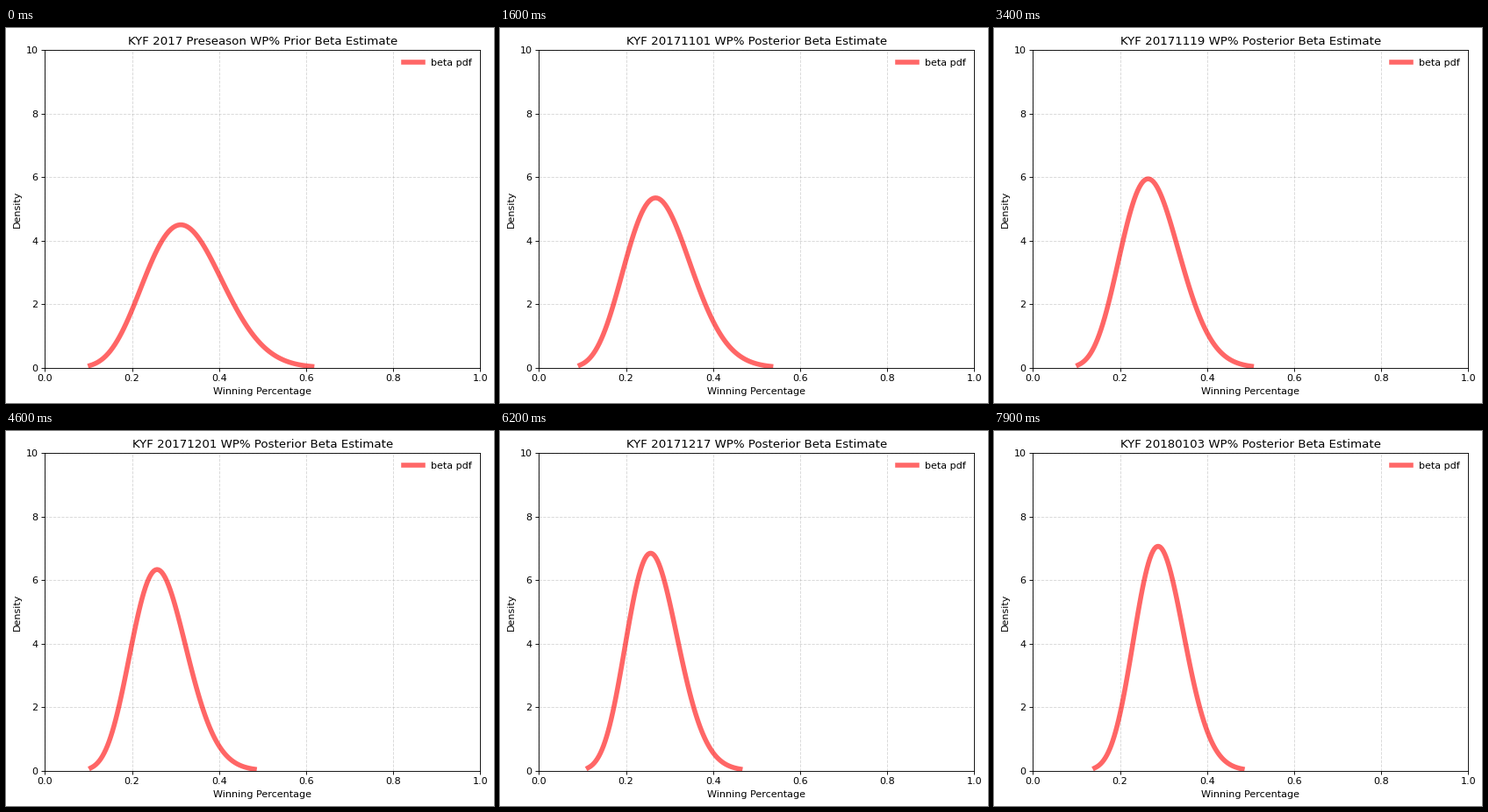
Recreate the animation shown at these times as a matplotlib script. Size 556 by 428 pixels, loop 8000 ms.

```python
from math import lgamma

import matplotlib.pyplot as plt
import numpy as np
from matplotlib.animation import FuncAnimation

plt.rcParams["font.family"] = "DejaVu Sans"

W, H, DPI = 556, 428, 80
FRAMES, STEP = 80, 100
TEAM = "KYF"
EVE = np.datetime64("2017-10-16")  # day before the season opens

# Prior pseudo-counts, then the days (after EVE) of each win and loss
PRIOR = 9.08, 18.82
WINS = np.array([2, 20, 30, 39, 47, 54, 63, 68, 72, 75])
LOSSES = np.array([4, 6, 7, 10, 11, 13, 16, 18, 21, 25, 26, 28, 33, 35, 37,
                   40, 45, 49, 51, 55, 57, 59, 60, 65, 67, 74, 78])

GRID = np.linspace(0, 1, 4001)[1:-1]


def beta_pdf(x, a, b):
    norm = lgamma(a + b) - lgamma(a) - lgamma(b)
    return np.exp(norm + (a - 1) * np.log(x) + (b - 1) * np.log1p(-x))


def beta_curve(a, b):
    """Density between the 0.1% and 99.9% quantiles."""
    cdf = np.cumsum(beta_pdf(GRID, a, b))
    lo, hi = np.interp([0.001, 0.999], cdf / cdf[-1], GRID)
    x = np.linspace(lo, hi, 100)
    return x, beta_pdf(x, a, b)


fig = plt.figure(figsize=(W / DPI, H / DPI), dpi=DPI, facecolor="white")
ax = fig.add_axes([44.4 / W, 40.4 / H, 496 / W, 362.4 / H])
line, = ax.plot([], [], "r-", lw=5, alpha=0.6, label="beta pdf")
ax.set(xlim=(0, 1), ylim=(0, 10),
       xlabel="Winning Percentage", ylabel="Density")
ax.grid(linestyle="--", alpha=0.5)
ax.legend(loc="upper right", frameon=False)
title = ax.set_title("")


def update(day):
    a = PRIOR[0] + np.sum(WINS <= day)
    b = PRIOR[1] + np.sum(LOSSES <= day)
    line.set_data(*beta_curve(a, b))
    if day == 0:
        when, kind = "2017 Preseason", "Prior"
    else:
        when, kind = str(EVE + day).replace("-", ""), "Posterior"
    title.set_text(f"{TEAM} {when} WP% {kind} Beta Estimate")
    return line, title


anim = FuncAnimation(fig, update, frames=FRAMES, interval=STEP,
                     repeat=True, repeat_delay=0)
plt.show()
```
